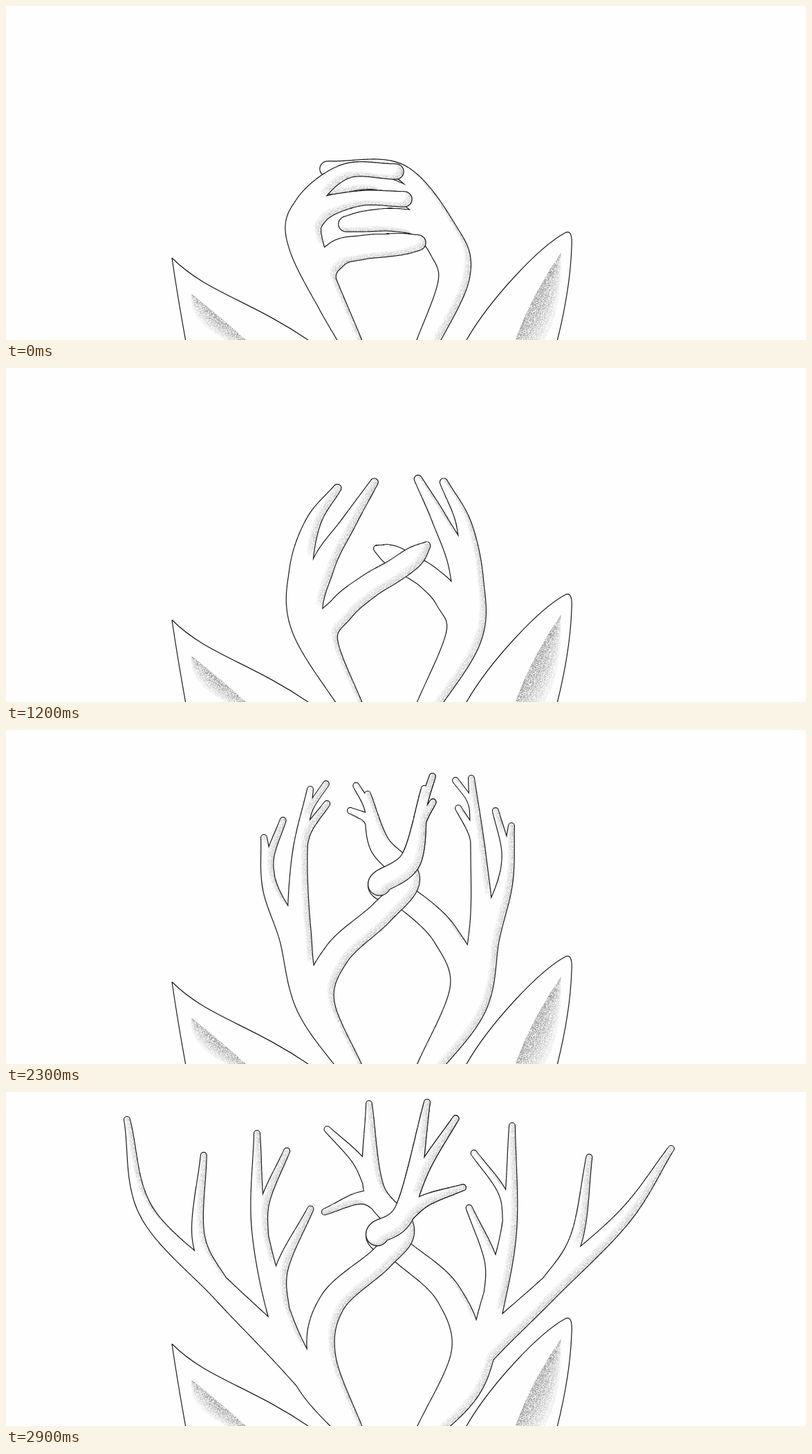
An HTML page with a canvas that plays this animation: 1157x484 px, repeating every 3.6 s.

```html
<!DOCTYPE html>
<html lang="en">
<head>
<meta charset="utf-8">
<title>Growing antlers</title>
<style>
html, body { margin: 0; width: 100%; height: 100%; overflow: hidden; background: #fefefe; }
canvas { display: block; }
</style>
</head>
<body>
<canvas id="stage" width="1157" height="484"></canvas>
<script>
const W = 1157, H = 484, LOOP = 3600, STEP = 100, FIRST = 3, LAST = 29;
const PAPER = '#fefefe', INK = '#1a1a1a';
const ctx = document.getElementById('stage').getContext('2d');
const layer = document.createElement('canvas').getContext('2d');
layer.canvas.width = W;
layer.canvas.height = H;

// Every tine grows from its antler's base; centre lines pass through a few key points.
const bases = { left: [505, 500], right: [604, 500] };
const poses = [
  { step: 3,
    left: ['430,350 434,290 490,240 564,240', '440,350 450,300 510,279 576,280',
      '458,400 478,360 515,350 550,347 575,345 596,343'],
    right: ['651,390 635,325 570,240 465,236', '648,390 620,310 545,258 470,262',
      '645,400 630,350 600,318 560,310 520,312 492,316'] },
  { step: 8,
    left: ['430,360 430,300 466,248 530,209', '440,360 455,305 508,274 576,237',
      '462,395 484,360 520,340 555,327 585,314 603,308'],
    right: ['656,380 648,320 607,250 552,205', '655,380 635,310 595,252 552,229',
      '652,385 635,345 610,325 580,312 555,302 530,298'] },
  { step: 15,
    left: ['436,390 424,290 428,205 441,148', '440,380 460,275 484,190 500,112',
      '458,395 487,340 530,297 565,270 592,245 612,220'],
    right: ['676,400 693,300 704,210 694,136', '670,390 676,280 651,195 629,110',
      '660,385 642,325 612,288 588,268 562,250 544,236'] },
  { step: 23,
    left: ['440,400 412,300 382,228 373,156', '435,380 424,290 425,180 440,86',
      '455,395 478,325 543,265 582,215 540,165 523,93'],
    right: ['675,400 697,300 722,220 731,139', '668,390 687,290 683,180 673,70',
      '662,375 636,298 582,246 540,224 586,187 605,85'] },
  { step: 29, ease: 1.3,
    left: ['411,386 313,287 203,173 175,40', '440,420 398,330 366,195 363,60',
      '457,385 472,305 543,241 574,198 532,140 525,17'],
    right: ['675,392 778,291 893,182 962,82', '672,420 703,310 728,195 732,49',
      '664,378 640,293 578,236 537,207 578,170 609,15'] }
];
for (const p of poses)
  for (const side in bases)
    p[side] = p[side].map(s => [bases[side], ...s.split(' ').map(q => q.split(',').map(Number))]);

// Full-grown forks per tine: place along the tine, length, angle in degrees.
const forks = {
  left: [[[.5, 197, 37]], [[.7, 142, 25], [.5, 166, 33]], [[.83, 111, -20], [.78, 85, -56]]],
  right: [[[.5, 207, -28]], [[.75, 118, -32], [.5, 146, -27]], [[.84, 146, 10], [.8, 103, 22]]]
};

// Tine widths from base to tip.
const thin = [30, 40, 34, 22], thick = [30, 40, 38, 35, 33, 30];
const mix = (a, b, t) => a + (b - a) * t;

// Catmull-Rom through [x, y, width] points, u from 0 to 1.
function at(p, u) {
  const last = p.length - 1, i = Math.min(last - 1, Math.floor(u * last)), t = u * last - i;
  const b = p[i], c = p[i + 1];
  return b.map((v, k) => {
    const a = p[i - 1] ? p[i - 1][k] : 2 * v - c[k];
    const d = p[i + 2] ? p[i + 2][k] : 2 * c[k] - v;
    return v + t / 2 * (c[k] - a + t * (2 * a - 5 * v + 4 * c[k] - d + t * (3 * (v - c[k]) + d - a)));
  });
}

function makeFork(tine, [place, length, degrees], grown) {
  const u = 1 - (1 - place) * grown, len = length * grown;
  const [x, y, w] = at(tine, u), p = at(tine, u - .02), q = at(tine, Math.min(1, u + .02));
  const dir = Math.atan2(q[1] - p[1], q[0] - p[0]);
  const turn = dir + degrees * Math.PI / 180 * Math.sqrt(grown);
  const dx = len * Math.cos(turn), dy = len * Math.sin(turn);
  return [
    [x, y, w * .8],
    [x + dx / 4 + Math.cos(dir) * len * .2, y + dy / 4 + Math.sin(dir) * len * .2, w * .55],
    [x + dx, y + dy, 9]
  ];
}

function sample(points, from = 0) {
  return Array.from({ length: 241 }, (_, i) => at(points, mix(from, 1, i / 240)));
}

// The union of round dabs along all limbs.
function blob(limbs, grow) {
  const path = new Path2D();
  for (const [x, y, w] of limbs.flat()) {
    const r = Math.max(.1, w / 2 + grow);
    path.moveTo(x + r, y);
    path.arc(x, y, r, 0, 7);
  }
  return path;
}

// Pencil grain for the shading.
function makeGrain() {
  const tile = document.createElement('canvas');
  tile.width = tile.height = 128;
  const g = tile.getContext('2d'), img = g.createImageData(128, 128);
  let seed = 7;
  for (let i = 3; i < img.data.length; i += 4) {
    seed = (seed * 16807) % 2147483647;
    img.data[i] = seed / 2147483647 * 22;
  }
  g.putImageData(img, 0, 0);
  return ctx.createPattern(tile, 'repeat');
}
const grain = makeGrain();

// Outline and fill limbs as one shape, shaded along its lower right edges.
function paint(limbs) {
  const body = blob(limbs, -.6);
  ctx.fillStyle = INK;
  ctx.fill(blob(limbs, .6));
  ctx.fillStyle = PAPER;
  ctx.fill(body);
  for (const depth of [4, 8, 11]) {
    layer.clearRect(0, 0, W, H);
    layer.fillStyle = grain;
    layer.fill(body);
    layer.save();
    layer.globalCompositeOperation = 'destination-out';
    layer.fillStyle = '#000';
    layer.translate(-.8 * depth, -.6 * depth);
    layer.fill(body);
    layer.restore();
    ctx.drawImage(layer.canvas, 0, 0);
  }
}

const earLines = new Path2D('M240 365Q248 420 260 486M240 365C290 415 350 425 437 484' +
  'M666 484C700 425 770 350 808 329Q820 322 818 350Q816 410 797 486');

// Shade from a to b between the bend of the fold and a soft outer bend.
function shadeEar(a, b, fold, soft) {
  ctx.fillStyle = grain;
  for (let t = .2; t <= 1; t += .16) {
    ctx.beginPath();
    ctx.moveTo(...a);
    ctx.quadraticCurveTo(...fold, ...b);
    ctx.quadraticCurveTo(mix(fold[0], soft[0], t), mix(fold[1], soft[1], t), ...a);
    ctx.fill();
  }
}

function drawEars() {
  shadeEar([268, 417], [372, 506], [310, 450], [260, 470]);
  shadeEar([803, 357], [728, 510], [752, 430], [805, 510]);
  ctx.strokeStyle = INK;
  ctx.lineWidth = 1.2;
  ctx.stroke(earLines);
}

function antler(side, step) {
  const next = Math.max(1, poses.findIndex(p => p.step >= step));
  const from = poses[next - 1], to = poses[next];
  const t = 1 - (1 - (step - from.step) / (to.step - from.step)) ** (to.ease || 1);
  const tip = Math.max(9, 26 - 1.2 * step);
  const grown = Math.max(0, (step - 10) / (LAST - 10)) ** 1.8;
  return from[side].map((points, n) => {
    const widths = [...(n < 2 ? thin : thick), tip];
    const tine = points.map(([x, y], i) =>
      [mix(x, to[side][n][i][0], t), mix(y, to[side][n][i][1], t), widths[i]]);
    const branches = grown ? forks[side][n].map(f => sample(makeFork(tine, f, grown))) : [];
    return { tine, branches };
  });
}

function draw(step) {
  const left = antler('left', step), right = antler('right', step);
  const all = side => side.flatMap(({ tine, branches }) => [sample(tine), ...branches]);
  ctx.fillStyle = PAPER;
  ctx.fillRect(0, 0, W, H);
  drawEars();
  paint(all(right));
  paint(all(left));
  // Once the beams twist, the end of the right one passes in front.
  if (step > 16) paint([sample(right[2].tine, .67), ...right[2].branches]);
}

let shown = -1;
function tick(now) {
  const step = Math.min(LAST, Math.max(FIRST, Math.floor(now % LOOP / STEP)));
  if (step !== shown) draw(shown = step);
  requestAnimationFrame(tick);
}
tick(performance.now());
</script>
</body>
</html>
```
